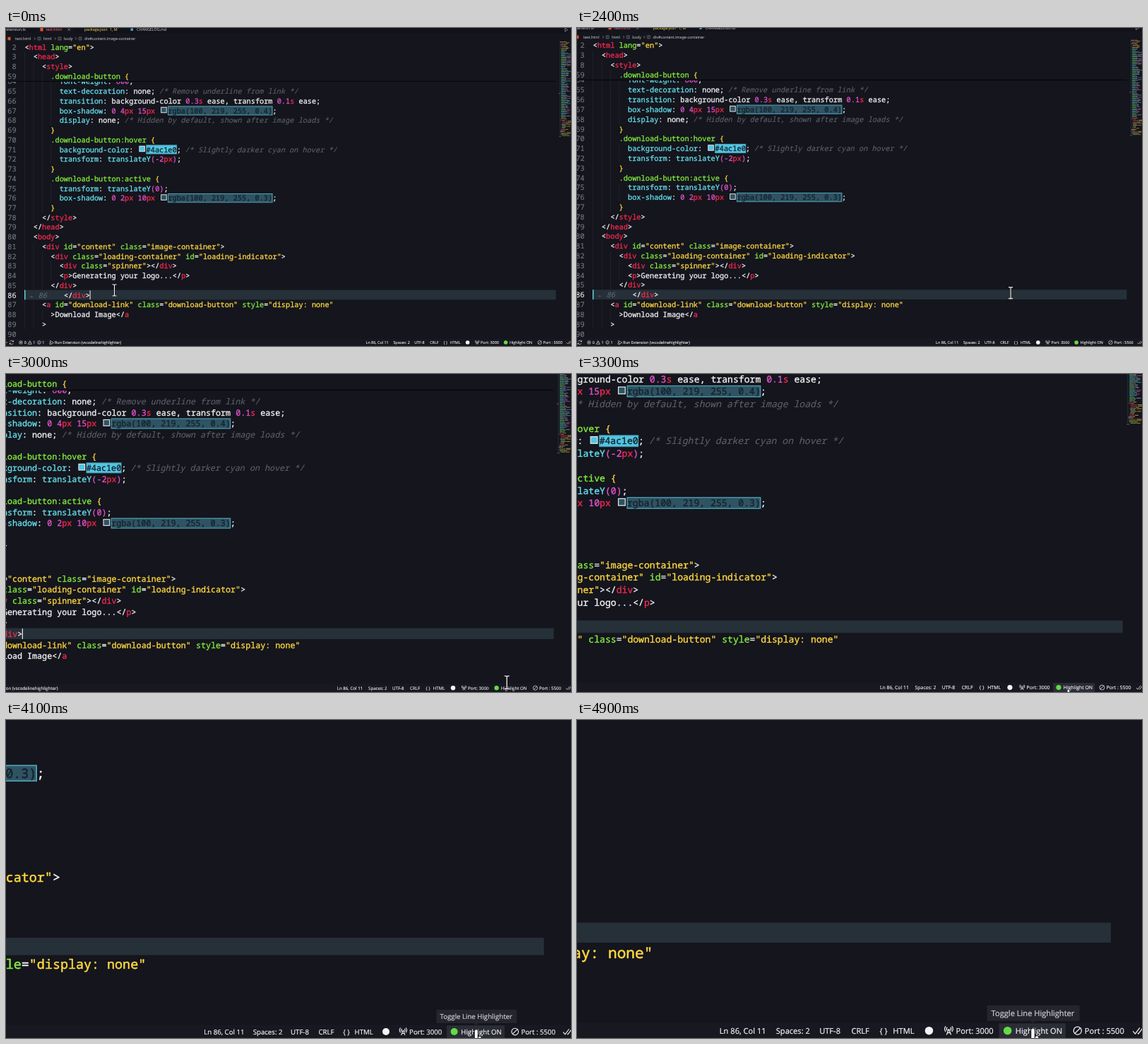
These frames come from a looping animation (800 by 450 pixels, 5 s). An HTML page with a canvas:

```html
<!DOCTYPE html>
<html lang="en">
<head>
<meta charset="utf-8">
<style>
html, body { margin: 0; width: 100%; height: 100%; overflow: hidden; background: #14151d; }
canvas { display: block; }
</style>
</head>
<body>
<canvas id="stage" width="800" height="450"></canvas>
<script>
const ctx = document.getElementById('stage').getContext('2d');
const LOOP = 5000, LEFT = 26.4, CHAR = 6.16, PITCH = 13.74;
const BG = '#14151d', WHITE = '#f4f4f6', GREY = '#b0b2b9', RED = '#f5284f', YELLOW = '#ffd83f';
const MONO = "10.27px 'Roboto Mono', 'Noto Sans Mono', monospace";
const UI = "5.4px 'Open Sans', 'Noto Sans', sans-serif";
const COLORS = { comment: '#5d6069', string: YELLOW, selector: '#84ee3e', prop: '#67e1ef',
  tag: RED, attr: '#84ee3e', num: '#e152c8', unit: RED, paren: '#e152c8', brace: YELLOW, plain: WHITE };
const TOKEN = new RegExp([
  '(?<comment>/\\*.*?\\*/)', '(?<string>"[^"]*")', '(?<color>rgba\\([^)]*\\)|#[0-9a-f]{6})',
  '(?<selector>^\\.[\\w:-]+)', '(?<prop>^[\\w-]+(?=:)|translateY)', '(?<tag>(?<=</?)\\w+)',
  '(?<attr>\\w+(?==))', '(?<num>-?\\b\\d[\\d.]*)', '(?<unit>(?<=\\d)(?:px|s)\\b)',
  '(?<paren>[()])', '(?<brace>[{}])', '(?<plain>\\w+|\\S)'].join('|'), 'g');

const STICKY = [[2, '<html lang="en">'], [3, '  <head>'], [8, '    <style>'], [59, '      .download-button {']];
const CODE = `        font-weight: 600;
        text-decoration: none; /* Remove underline from link */
        transition: background-color 0.3s ease, transform 0.1s ease;
        box-shadow: 0 4px 15px rgba(100, 219, 255, 0.4);
        display: none; /* Hidden by default, shown after image loads */
      }
      .download-button:hover {
        background-color: #4ac1e0; /* Slightly darker cyan on hover */
        transform: translateY(-2px);
      }
      .download-button:active {
        transform: translateY(0);
        box-shadow: 0 2px 10px rgba(100, 219, 255, 0.3);
      }
    </style>
  </head>
  <body>
    <div id="content" class="image-container">
      <div class="loading-container" id="loading-indicator">
        <div class="spinner"></div>
        <p>Generating your logo...</p>
      </div>
    </div>
    <a id="download-link" class="download-button" style="display: none"
      >Download Image</a
    >
`.split('\n');
const FIRST = 64, ACTIVE = 86;
const lineY = n => 75.76 + (n - FIRST) * PITCH;

// Mouse keys: time, x, y
const MOUSE = [[0, 153.5, 371], [600, 413, 312], [1300, 726, 438], [1450, 725, 443.5], [2050, 725, 443.5],
  [2200, 695, 422], [2400, 615, 375.4], [2550, 632, 374], [2800, 711.6, 420], [3250, 717, 447.7],
  [3500, 725, 443.5], [5000, 725, 443.5]];

function mouseAt(t) {
  const last = MOUSE.length - 1;
  let i = 0;
  while (i < last - 1 && MOUSE[i + 1][0] <= t) i++;
  const a = MOUSE[i], b = MOUSE[i + 1], span = b[0] - a[0], u = (t - a[0]) / span;
  const slope = (k, axis) => {
    if (k === 0 || k === last) return 0;
    const p = MOUSE[k - 1], q = MOUSE[k], r = MOUSE[k + 1];
    const turns = (q[axis] - p[axis]) * (r[axis] - q[axis]) <= 0;
    return turns ? 0 : (r[axis] - p[axis]) / (r[0] - p[0]);
  };
  return [1, 2].map(axis => {
    const ease = u * u * (3 - 2 * u);
    return a[axis] + (b[axis] - a[axis]) * ease
      + span * (slope(i, axis) * u * (1 - u) ** 2 - slope(i + 1, axis) * u * u * (1 - u));
  });
}

function zoomAt(t) {
  const p = Math.min(1, Math.max(0, (t - 2260) / 2900));
  return 1 + 1.077 * (p < 0.5 ? 2 * p * p : 1 - 2 * (1 - p) ** 2);
}

// A thin outline of the same colour gives the glyphs a medium weight
function text(str, x, y, color, font = UI, weight = 0.1) {
  ctx.font = font;
  ctx.fillStyle = ctx.strokeStyle = color;
  ctx.lineWidth = weight;
  ctx.lineJoin = 'round';
  ctx.fillText(str, x, y);
  ctx.strokeText(str, x, y);
}

const code = (str, x, y, color) => text(str, x, y + 3.6, color, MONO, 0.28);
const italic = (str, x, y, color) => text(str, x - 0.8, y + 3.6, color, 'italic ' + MONO);

function rect(x, y, w, h, color) {
  ctx.fillStyle = color;
  ctx.fillRect(x, y, w, h);
}

function disc(x, y, r, color) {
  ctx.fillStyle = color;
  ctx.beginPath();
  ctx.arc(x, y, r, 0, 7);
  ctx.fill();
}

function stroke(d, color = WHITE, width = 0.6) {
  ctx.strokeStyle = color;
  ctx.lineWidth = width;
  ctx.stroke(new Path2D(d));
}

function ring(x, y, r) {
  stroke(`M${x - r} ${y}a${r} ${r} 0 1 0 ${2 * r} 0a${r} ${r} 0 1 0 ${-2 * r} 0`);
}

function colorBox(str, x, y) {
  const fill = str[0] === '#' ? '#52c5e2' : '#2f5362', width = str.length * CHAR;
  rect(x + 1.8, y - 5.3, 8.6, 8.6, '#dfe5e8');
  rect(x + 2.8, y - 4.3, 6.6, 6.6, fill);
  rect(x + 11.6, y - 6.6, width + 0.8, 13.2, '#4d9fb5');
  rect(x + 12.6, y - 5.6, width - 1.2, 11.2, fill);
  code(str, x + 12, y, '#14222b');
}

function codeLine(n, line, y) {
  const body = line.trimStart(), indent = line.length - body.length;
  for (let c = 0; c < indent; c += 2) rect(LEFT + c * CHAR, y - PITCH / 2, 0.6, PITCH, '#282a33');
  const active = n === ACTIVE;
  text(n, 14.6 - String(n).length * CHAR, y + 3.6, active ? WHITE : '#777a84', MONO);
  let x = LEFT + indent * CHAR;
  if (active) {
    italic('← 86', 34, y, '#5d6972');
    x += 31;
  }
  for (const m of body.matchAll(TOKEN)) {
    const kind = Object.keys(m.groups).find(k => m.groups[k] !== undefined);
    const at = x + m.index * CHAR;
    if (kind === 'color') {
      colorBox(m[0], at, y);
      x += 12;
    } else {
      (kind === 'comment' ? italic : code)(m[0], at, y, COLORS[kind]);
    }
  }
}

function editor(t) {
  const top = lineY(ACTIVE) - 7.3;
  rect(LEFT, top, 778.6 - LEFT, 13.7, '#263038');
  CODE.forEach((line, i) => codeLine(FIRST + i, line, lineY(FIRST + i)));
  rect(LEFT - 0.4, top, 1.5, 13.7, '#5fd3dc');
  if (t % 1000 < 250 || t % 1000 >= 750) rect(118.6, top + 0.6, 1, 13, WHITE);
  rect(0, 0, 778, 75.4, BG);
  STICKY.forEach(([n, line], i) => codeLine(n, line, 27 + i * 13.7));
  rect(0, 75, 778, 1, '#050609');
}

function header() {
  rect(0, 0, 800, 7.5, '#11121a');
  rect(44, 0, 52, 7.5, BG);
  text('extension.ts', -2.5, 4, GREY);
  rect(48.5, 0, 4, 4.5, '#e5532d');
  text('test.html', 56.5, 4, '#df5a63');
  stroke('M87.5 .5l3.4 3.4m0-3.4l-3.4 3.4', GREY);
  text('package.json', 111, 4, '#d8b54a');
  text('1, M', 147, 4, '#d8b54a');
  rect(176.5, 0.5, 3.5, 3.5, '#5e9ab5');
  text('CHANGELOG.md', 185, 4, GREY);
  stroke('M791.5 0l4 2.5l-4 2.5z', GREY);

  rect(2.5, 12.8, 4, 4.5, '#e5532d');
  text('test.html', 13, 17, GREY);
  [[53, 'html'], [82, 'body'], [111, 'div#content.image-container']].forEach(([x, label]) => {
    stroke(`M${x - 13} 13.3l1.6 1.7l-1.6 1.7`, GREY);
    stroke(`M${x - 8} 13h4v4h-4zM${x - 6} 13v4`, GREY, 0.4);
    text(label, x, 17, GREY);
  });
}

let seed = 11;
const random = () => (seed = seed * 16807 % 2147483647) / 2147483647;
const pick = list => list[Math.floor(random() * list.length)];
const minimapRows = Array.from({ length: 92 }, (_, i) => {
  const markup = i < 8 || i > 74;
  return {
    x: 784.5 + (markup ? random() * 3 : 1.5), y: 19 + i * 1.46, w: 5 + random() * 9.5,
    head: markup ? pick(['#679c3c', '#8d3047', '#85888e']) : pick(['#46909b', '#46909b', '#679c3c']),
    tail: markup ? '#a58c38' : pick(['#85888e', '#8d4a86', '#46909b']),
  };
});

function minimap() {
  rect(784, 19, 0.6, 134, '#29414a');
  for (const { x, y, w, head, tail } of minimapRows) {
    rect(x, y, w * 0.55, 0.8, head);
    rect(x + w * 0.6, y, w * 0.4, 0.8, tail);
  }
  rect(782, 92, 3, 1, '#8d3047');
  rect(783, 153, 3, 1, '#8d3047');
}

function statusBar(hover) {
  rect(0, 439.7, 800, 10.3, '#171820');
  if (hover) rect(701.7, 440, 45.8, 10, '#2b2d36');
  stroke('M0 445h2M10.4 444a2.7 2.7 0 0 0-5-.3m0 2.3a2.7 2.7 0 0 0 5 .2M10.6 442v2h-2M5.2 448v-2h2');
  ring(21, 445, 2.3);
  stroke('M20 444l2 2m0-2l-2 2M33.8 442.7l2.6 4.6h-5.2zM33.8 444.2v1.6M47 444.7v1.7m0-2.8v.5');
  ring(47, 445, 2.3);
  stroke('M62.5 442.5l5 2.8l-4 2.3m-1-5v2.4');
  ring(62.8, 446.5, 1.2);
  [[25.8, '0'], [38.3, '1'], [51.3, '1'], [69, 'Run Extension (vscodelinehighlighter)'],
    [509.6, 'Ln 86, Col 11'], [548.4, 'Spaces: 2'], [578.2, 'UTF-8'], [600.2, 'CRLF'], [619.6, '{ }'],
    [628.8, 'HTML'], [672.1, 'Port: 3000'], [713, 'Highlight ON'], [760.6, 'Port : 5500']
  ].forEach(([x, label]) => text(label, x, 447, WHITE));
  disc(653.6, 445, 2.8, WHITE);
  stroke('M667.2 443.8l-1.5 4m1.5-4l1.5 4m-2.4-1.4h1.8M666.1 444.9a1.7 1.7 0 0 1 0-2.2m2.2 0a1.7 1.7 0 0 1 0 2.2M665.1 445.7a3 3 0 0 1 0-3.8m4.2 0a3 3 0 0 1 0 3.8');
  disc(707.6, 445, 2.8, '#62dc43');
  ring(755.7, 445, 2.7);
  stroke('M753.8 446.9l3.8-3.8M793.8 445.3l1.5 1.8l3.2-4.2M797 446.6l.5.5l3.2-4.2');
}

function tooltip() {
  rect(693.5, 427.6, 63.6, 10.7, '#25262d');
  ctx.fill(new Path2D('M723.2 438.2h3.6l-1.8 1.7z'));
  text('Toggle Line Highlighter', 696.4, 435, '#cfd0d4');
}

function hand(x, y) {
  [[2.7, 5.2], [0, 0]].forEach(([dx, dy]) => {
    ctx.beginPath();
    ctx.roundRect(x - 1.1 + dx, y + dy, 2.2, 10, 1);
    ctx.strokeStyle = '#0b0c10';
    ctx.lineWidth = 0.9;
    ctx.stroke();
    ctx.fillStyle = '#fff';
    ctx.fill();
  });
}

function beam(x, y) {
  const d = `M${x - 3} ${y - 8}h2q1 0 1 1v14q0 1-1 1h-2M${x + 3} ${y - 8}h-2q-1 0-1 1v14q0 1 1 1h2`;
  stroke(d, '#0b0c10', 2);
  stroke(d, '#fff', 1.1);
}

function draw(now) {
  const t = now % LOOP, s = zoomAt(t), [x, y] = mouseAt(t);
  const hover = y > 440 && x > 701.7 && x < 747.5;
  ctx.setTransform(1, 0, 0, 1, 0, 0);
  rect(0, 0, 800, 450, BG);
  // Zoom about the bottom right corner
  ctx.setTransform(s, 0, 0, s, 800 * (1 - s), 450 * (1 - s));
  ctx.textRendering = 'geometricPrecision';
  editor(t);
  header();
  minimap();
  statusBar(hover);
  if (hover && (t >= 1650 && t < 2200 || t >= 3700)) tooltip();
  (hover ? hand : beam)(x, y);
}

const start = performance.now();
function tick() {
  draw(performance.now() - start);
  requestAnimationFrame(tick);
}
tick();
</script>
</body>
</html>
```
